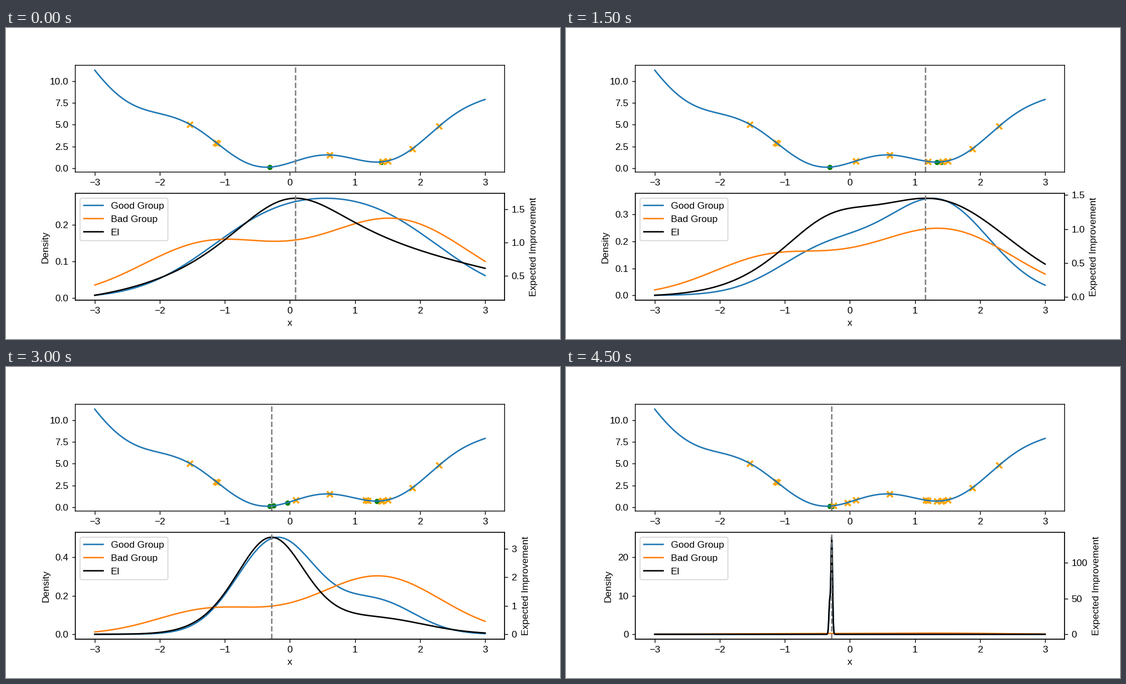
Write a matplotlib script that moves like this. It is 998 px wide and 561 px high and loops after 5000 ms.

```python
import math

import matplotlib.pyplot as plt
import numpy as np
from matplotlib.animation import FuncAnimation

W, H = 998, 561
DPI = W / 8
STEPS, STEP_MS = 10, 500
GOOD_SHARE = 0.2
START = [-1.543, -1.135, -1.115, -0.311, 0.613, 1.40, 1.425, 1.505, 1.885, 2.295]

plt.rcParams.update({
    "font.family": "Liberation Sans",
    "font.size": 10,
    "path.snap": False,
})


def objective(x):
    return np.sin(3 * x) + x**2 - 0.7 * x + 0.6


def kde(points, x):
    """Gaussian density estimate with Scott's bandwidth."""
    n = len(points)
    bw = points.std(ddof=1) * n ** -0.2
    z = (x[:, None] - points) / bw
    return np.exp(-z**2 / 2).sum(axis=1) / (n * bw * math.sqrt(2 * math.pi))


def search(points, x):
    """Split, estimate and pick the next point, once per step."""
    points = np.array(points)
    steps = []
    for _ in range(STEPS):
        points = points[np.argsort(objective(points), kind="stable")]
        n_good = math.ceil(GOOD_SHARE * len(points))
        good, bad = points[:n_good], points[n_good:]
        p_good, p_bad = kde(good, x), kde(bad, x)
        ei = p_good / p_bad
        pick = x[ei.argmax()]
        steps.append((good, bad, p_good, p_bad, ei, pick))
        points = np.append(points, pick)
    return steps


grid = np.linspace(-3, 3, 1000)
steps = search(START, grid)

fig, (top, low) = plt.subplots(2, 1, figsize=(W / DPI, H / DPI), dpi=DPI)
fig.subplots_adjust(left=0.125, right=0.9, bottom=0.125, top=0.88, hspace=0.2)
right = low.twinx()

top.plot(grid, objective(grid))
good_dots = top.scatter([], [], s=20, c="green", marker="o")
bad_marks = top.scatter([], [], c="orange", marker="x", linewidths=2)

good_line, = low.plot(grid, grid * 0, label="Good Group")
bad_line, = low.plot(grid, grid * 0, label="Bad Group")
ei_line, = right.plot(grid, grid * 0, color="black", label="EI")
pick_lines = [ax.axvline(0, color="gray", ls="--") for ax in (top, right)]

low.set_xlabel("x")
low.set_ylabel("Density", labelpad=5.4)
right.set_ylabel("Expected Improvement", labelpad=5)
right.legend(handles=[good_line, bad_line, ei_line], loc="upper left")


def place(marks, x):
    marks.set_offsets(np.column_stack([x, objective(x)]))


def draw(i):
    good, bad, p_good, p_bad, ei, pick = steps[i]
    place(good_dots, good)
    place(bad_marks, bad)
    good_line.set_ydata(p_good)
    bad_line.set_ydata(p_bad)
    ei_line.set_ydata(ei)
    for line in pick_lines:
        line.set_xdata([pick, pick])
    for ax in (low, right):
        ax.relim()
        ax.autoscale_view()
    return []


anim = FuncAnimation(fig, draw, frames=STEPS, interval=STEP_MS,
                     init_func=lambda: [], repeat=True, repeat_delay=0)
plt.show()
```
